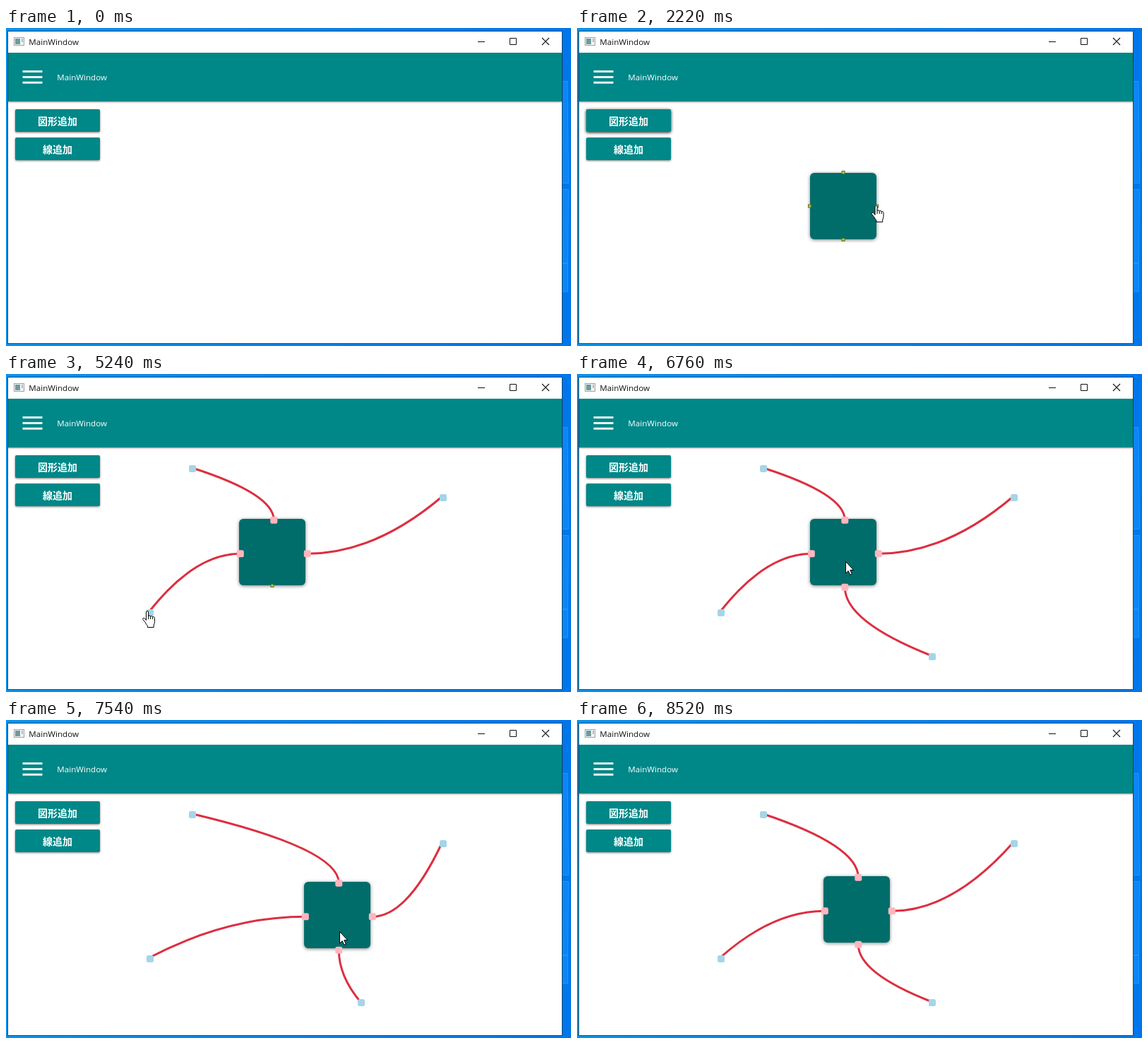
Recreate the animation shown at these times as an HTML page. Size 800 px wide and 450 px high, loop 9.1 s.

```html
<!DOCTYPE html>
<html lang="ja">
<head>
<meta charset="utf-8">
<title>MainWindow</title>
<style>
  html, body { margin: 0; width: 100%; height: 100%; overflow: hidden; }
  svg { display: block; width: 800px; height: 450px; }
  .ui { font: 11.6px "Open Sans", "Noto Sans", sans-serif; }
  .btn text { font: bold 14px "Noto Sans CJK JP", "Noto Sans CJK", sans-serif; fill: #fff; text-anchor: middle; }
  .raised { filter: drop-shadow(0 1px 1.8px rgba(0, 0, 0, .5)); }
  #box { filter: drop-shadow(0 1px 2.4px rgba(0, 0, 0, .5)); }
  .bar { filter: drop-shadow(0 1px 1.2px rgba(0, 0, 0, .4)); }
  .mini { fill: #b6cc3c; stroke: #55702a; }
  .mini.hot { fill: #a5d5e8; }
  .link path { fill: none; stroke: #dc2f40; stroke-width: 3; }
  .from { fill: #ffb6be; }
  .to { fill: #a5d5e8; }
  #arrow, #hand { fill: #fff; stroke: #000; stroke-linejoin: round; }
</style>
</head>
<body>
<svg viewBox="0 0 800 450">
  <defs>
    <linearGradient id="sky">
      <stop stop-color="#0b92ea"/><stop offset="1" stop-color="#0076ea"/>
    </linearGradient>
    <clipPath id="face"><rect x="13" y="115" width="120" height="32" rx="2"/></clipPath>
  </defs>

  <rect width="800" height="450" fill="url(#sky)"/>
  <g fill="#0a86f6" stroke="#1b97fa">
    <path d="M780 75.500H795L796.500 219.500H780zM780 228.500H796.500L795.500 332.500H780z"/>
    <path d="M780 333.500H795.500V373H780z"/>
  </g>
  <rect x="2.500" y="4.500" width="785" height="442" fill="#fff" stroke="#17496b"/>

  <g class="ui">
    <rect x="11.500" y="13.500" width="14" height="11" fill="#f4f6f7" stroke="#9aa0a5"/>
    <rect x="13" y="15" width="7" height="8" fill="#6f9a9c"/>
    <path d="M22 15h2v5h-2z" fill="#a9b9c4"/>
    <text x="32.300" y="24" fill="#111">MainWindow</text>
    <g fill="none" stroke="#111">
      <path d="M668 19.500h10M713.500 14.500h9v9h-9z"/>
      <path d="M759 14l10 10m0-10l-10 10" stroke-width="1.200"/>
    </g>
    <rect class="bar" x="3" y="35" width="784" height="69" fill="#008787"/>
    <path d="M23.500 61.500h28M23.500 69.500h28M23.500 77.300h28" stroke="#e9f5f5" stroke-width="3"/>
    <text x="72.300" y="74" fill="#fff">MainWindow</text>
  </g>

  <g id="shape">
    <rect id="box" width="94" height="94" rx="6" fill="#006d6b"/>
  </g>

  <g class="btn">
    <rect id="add" class="raised" x="13" y="115" width="120" height="32" rx="2" fill="#008787"/>
    <g clip-path="url(#face)"><circle id="ripple" cx="80" cy="129" fill="#fff"/></g>
    <text x="73" y="136.500">図形追加</text>
    <rect class="raised" x="13" y="155" width="120" height="32" rx="2" fill="#008787"/>
    <text x="73" y="176.500">線追加</text>
  </g>

  <g id="links"></g>

  <g id="cursor">
    <path id="arrow" d="M.5.500V17L4.200 13.600L6.800 19.300L9.300 18.200L6.800 12.500H11.700z"/>
    <path id="hand" d="M-1.500 13.500V2Q-1.500.300 0 .300Q1.600.300 1.600 2V8Q1.600 6.700 3.100 6.800Q4.700 7 4.700 8.500Q5 7.300 6.300 7.500Q7.700 7.800 7.700 9.200Q8.200 8.300 9.300 8.700Q10.500 9.100 10.500 10.500V15.500Q10.500 18 9.200 20V23.500H.500V21.500Q-1 20-2.500 17L-6 12.500Q-6.800 10.800-5.500 10.300Q-4.200 9.900-3 11.500zM1.600 8V12M4.700 8.500V12M7.700 9.200V12"/>
  </g>
</svg>
<script>
const LOOP = 9100, SIZE = 94;
const PRESS = 780, SPAWN = 900, GRAB = 1140, DROP = 1680, REGRAB = 6980;
const rest = [330, 205];   // shape position after the first drag
const grip = [4, 3];       // line knob relative to the pointer
const tail = -1.5;         // line end relative to its knob

const $ = id => document.getElementById(id);
const clamp = (v, lo = 0, hi = 1) => Math.min(hi, Math.max(lo, v));
const ramp = (t, a, b) => clamp((t - a) / (b - a));
const ease = u => u * u * (3 - 2 * u);
const add = (p, q) => p.map((v, i) => v + q[i]);
const sub = (p, q) => p.map((v, i) => v - q[i]);

// Ports run counter-clockwise from the right side
const ports = [
  { end: [619, 175], reach: [1740, 2100], hover: 2080, drag: [2320, 2620], bow: 0 },
  { end: [264, 134], reach: [2780, 3160], hover: 3620, drag: [3820, 4080], bow: -.17 },
  { end: [204, 338], reach: [4240, 4460], hover: 4660, drag: [4940, 5220], bow: -.4 },
  { end: [503, 400], reach: [5260, 5620], hover: 5600, drag: [5920, 6100], bow: 0 }
];

const step = (span, to, bow = 0) => ({ span, to, bow });
const portSteps = ports.flatMap((p, i) => {
  const a = i * Math.PI / 2, r = SIZE / 2 + .5;
  p.spot = [SIZE / 2 + r * Math.cos(a), SIZE / 2 - r * Math.sin(a)];
  p.upright = i % 2 === 1;
  return [
    step(p.reach, add(add(rest, p.spot), [-1, -1]), p.bow),
    step(p.drag, sub(p.end, grip))
  ];
});

// Pointer moves in order; bow bends a move sideways by a share of its length
const steps = [
  step([100, 640], [80, 129]),
  step([960, GRAB], [148, 189]),
  step([GRAB, DROP], [378, 258]),
  ...portSteps,
  step([6400, 6760], [380, 265]),
  step([6880, REGRAB], [380, 275]),
  step([REGRAB, 7540], [472, 299], -.5),
  step([7540, 8200], [399, 291], -.4),
  step([8360, 8520], [805, 95], .1)
];

function pointer(t) {
  let pos = [412, 420];
  for (const { span, to, bow } of steps) {
    if (t < span[0]) break;
    const e = ease(ramp(t, ...span)), side = bow * Math.sin(Math.PI * e);
    const [dx, dy] = sub(to, pos);
    pos = add(pos, [dx * e - dy * side, dy * e + dx * side]);
  }
  return pos;
}

function shapeAt(t) {
  const [from, to] = t < REGRAB ? [GRAB, DROP] : [REGRAB, 8200];
  const held = sub(pointer(from), from === GRAB ? [100, 136] : rest);
  return sub(pointer(clamp(t, from, to)), held);
}

function set(el, attrs) {
  for (const k in attrs) el.setAttribute(k, attrs[k]);
}
function make(tag, parent, attrs = {}) {
  const el = document.createElementNS('http://www.w3.org/2000/svg', tag);
  set(el, attrs);
  return parent.appendChild(el);
}
const show = (el, on) => set(el, { visibility: on ? 'inherit' : 'hidden' });
const move = (el, [x, y]) => set(el, { transform: `translate(${x} ${y})` });

for (const p of ports) {
  const [x, y] = p.spot;
  p.dot = make('rect', $('shape'), { class: 'mini', x: x - 2, y: y - 2, width: 4, height: 4 });
  p.link = make('g', $('links'), { class: 'link' });
  p.line = make('path', p.link);
  const knob = name => make('rect', p.link, { class: name, x: -5, y: -5, width: 10, height: 10, rx: 2.5 });
  p.from = knob('from');
  p.to = knob('to');
}

function drawPort(p, t, shape) {
  const on = t >= p.drag[0];
  show(p.dot, !on);
  show(p.link, on);
  p.dot.classList.toggle('hot', t >= p.hover);
  if (!on) return;
  const start = add(add(shape, p.spot), [2.3, 2.3]);
  const knob = add(pointer(Math.min(t, p.drag[1])), grip);
  const end = add(knob, [tail, tail]);
  const mid = start.map((v, i) => (v + end[i]) / 2);
  const bend = p.upright ? [start[0], mid[1]] : [mid[0], start[1]];
  set(p.line, { d: `M${start}Q${bend} ${end}` });
  move(p.from, start);
  move(p.to, knob);
}

function drawButton(t) {
  const lift = ramp(t, 560, 760) * (1 - ramp(t, 2320, 2520));
  $('add').style.filter =
    `drop-shadow(0 1px ${1.8 + lift * .3}px rgba(0,0,0,${.5 + lift * .4}))`;
  const grow = ramp(t, PRESS, PRESS + 260);
  set($('ripple'), { r: 75 * grow, opacity: grow && .26 * (1 - ramp(t, 1040, 1240)) });
}

function drawCursor(t) {
  const hand = (t >= 560 && t < 960) ||
    ports.some(p => t >= p.hover && t < p.drag[1] + 160);
  show($('cursor'), t >= 100 && t < 8520);
  show($('hand'), hand);
  show($('arrow'), !hand);
  move($('cursor'), pointer(t));
}

function draw(t) {
  const shape = shapeAt(t);
  show($('shape'), t >= SPAWN);
  move($('shape'), shape);
  for (const p of ports) drawPort(p, t, shape);
  drawButton(t);
  drawCursor(t);
}

const began = performance.now();
function tick() {
  draw((performance.now() - began) % LOOP);
  requestAnimationFrame(tick);
}
tick();
</script>
</body>
</html>
```
